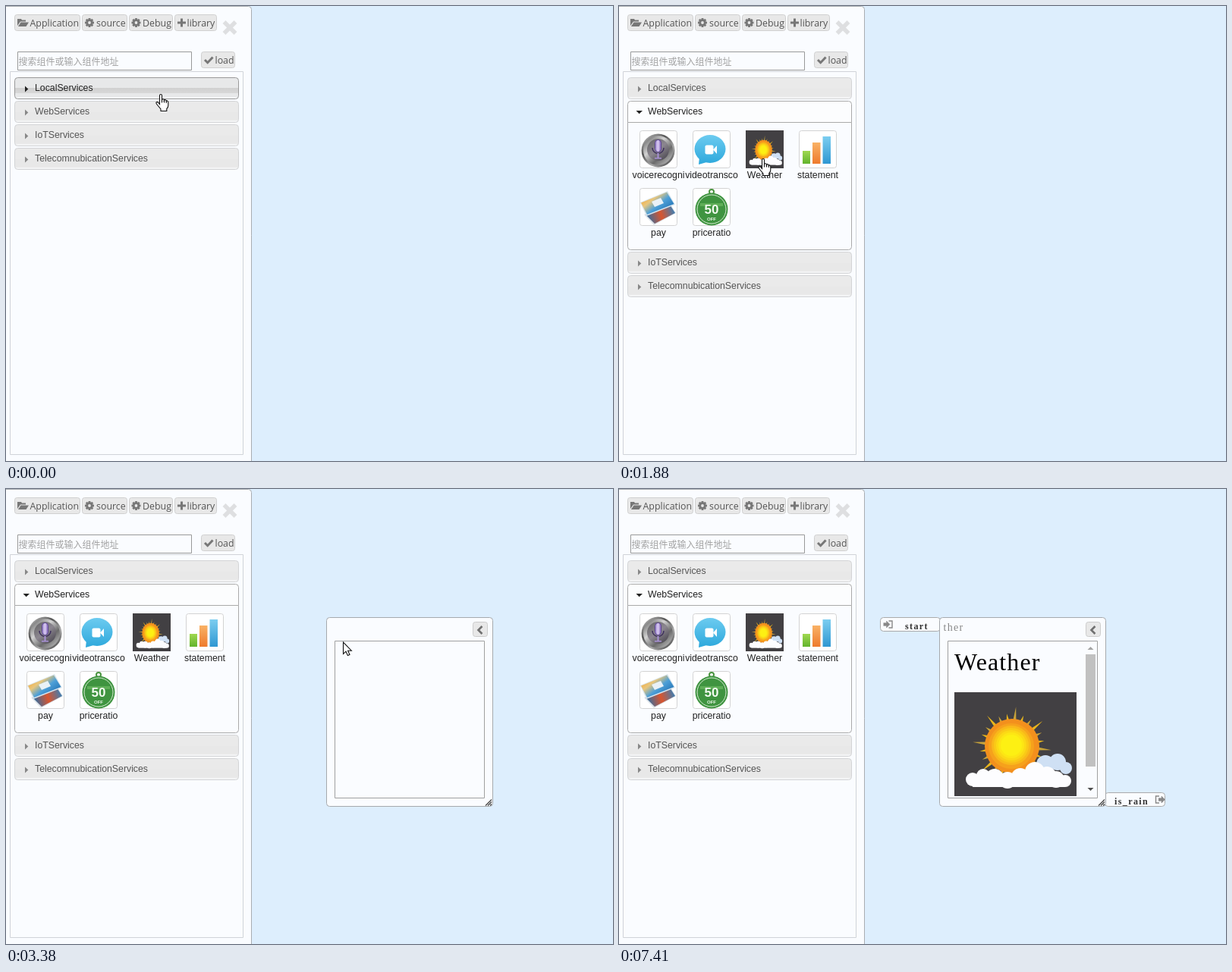
Recreate the animation shown at these times as an HTML page with a canvas. Size 800 by 600 pixels, loop 8910 ms.

```html
<!DOCTYPE html>
<html lang="en">
<head>
<meta charset="utf-8">
<title>Service composer</title>
<style>
html, body { margin: 0; width: 100%; height: 100%; overflow: hidden; background: #ddeefd; }
canvas { display: block; }
</style>
</head>
<body>
<canvas id="stage" width="800" height="600"></canvas>
<script>
const g = document.getElementById('stage').getContext('2d');
const LOOP = 8910;
const ARIAL = '12.3px "Liberation Sans", sans-serif';
const HUMAN = '12.4px "Open Sans", sans-serif';
const PAPER = '#fafcff';

// Each entry is [start time, ...values]; it holds until the next one.
const CURSOR = [
  [0, 'hand', 197, 116], [150, 'hand', 160, 119], [280, 'hand', 116, 129],
  [400, 'hand', 93, 135], [550, 'hand', 93, 139],
  [1340, 'hand', 94, 152], [1460, 'hand', 98, 186], [1610, 'hand', 168, 200],
  [1760, 'hand', 177, 201], [1880, 'hand', 183, 201],
  [2730, 'arrow', 400, 230], [2850, 'arrow', 481, 200], [3000, 'arrow', 496, 214],
  [3380, 'arrow', 444, 201], [3960, 'arrow', 457, 198], [4080, 'arrow', 472, 194],
  [4200, 'arrow', 480, 195], [4350, 'hand', 477, 189],
  [6320, 'hand', 499, 189], [6570, 'hand', 500, 189],
  [6850, 'arrow', 515, 214], [6970, 'arrow', 543, 260],
  [7110, 'arrow', 604, 406], [7260, 'arrow', 677, 544], [7410, 'none', 0, 0]
];
const HEIGHT = [[0, 0], [800, 4], [920, 42], [1040, 93], [1190, 167], [1340, 168]];
const GHOST = [[0], [2730, 326, 194], [2850, 407, 164], [3000, 422, 178], [3380]];
const TIP = [[0, 0], [2340, 0.4], [2460, 0.9], [2580, 0.5], [2730, 0.12], [3380, 0]];

const at = (list, t) => list.filter(k => k[0] <= t).pop().slice(1);

function box(x, y, w, h, fill, stroke, r = 0) {
  g.beginPath();
  g.roundRect(x + 0.5, y + 0.5, w - 1, h - 1, r);
  g.fillStyle = fill;
  g.fill();
  if (stroke) {
    g.strokeStyle = stroke;
    g.lineWidth = 1;
    g.stroke();
  }
}

function rect(x, y, w, h, fill) {
  g.fillStyle = fill;
  g.fillRect(x, y, w, h);
}

function disc(x, y, r, fill) {
  g.beginPath();
  g.arc(x, y, r, 0, 7);
  g.fillStyle = fill;
  g.fill();
}

function poly(points, fill) {
  g.beginPath();
  points.forEach(p => g.lineTo(...p));
  g.closePath();
  g.fillStyle = fill;
  g.fill();
}

function line(points, color, width) {
  g.beginPath();
  points.forEach(p => g.lineTo(...p));
  g.strokeStyle = color;
  g.lineWidth = width;
  g.stroke();
}

function text(s, x, y, font, color, align = 'left', spacing = 0) {
  g.font = font;
  g.fillStyle = color;
  g.textAlign = align;
  g.letterSpacing = spacing + 'px';
  g.fillText(s, x, y);
}

function blend(x0, y0, x1, y1, ...colors) {
  const f = g.createLinearGradient(x0, y0, x1, y1);
  colors.forEach((c, i) => f.addColorStop(i / (colors.length - 1), c));
  return f;
}

function placed(x, y, draw, sx = 1, sy = 1) {
  g.save();
  g.translate(x, y);
  g.scale(sx, sy);
  draw();
  g.restore();
}

function clipped(x, y, w, h, draw) {
  g.save();
  g.beginPath();
  g.rect(x, y, w, h);
  g.clip();
  draw();
  g.restore();
}

// --- toolbar ---

function gear(x, y) {
  for (let i = 0; i < 4; i++) {
    const a = i * Math.PI / 4, c = 6 * Math.cos(a), s = 6 * Math.sin(a);
    line([[x - c, y - s], [x + c, y + s]], '#777', 2.8);
  }
  disc(x, y, 4.7, '#777');
  disc(x, y, 1.9, '#e8e8e8');
}

function folder() {
  poly([[15, 26], [15, 17], [20, 17], [21, 18.5], [26, 18.5], [26, 20.5], [19, 20.5]], '#777');
  poly([[16, 27], [19.5, 21.5], [30, 21.5], [26.5, 27]], '#777');
}

function toolbar() {
  const button = (x, y, w, label, tx) => {
    box(x, y, w, 22, '#e8e8e8', '#d0d0d0', 3);
    text(label, tx, y + 16, HUMAN, '#555');
  };
  button(11, 11, 87, 'Application', 31.5);
  button(100, 11, 60, 'source', 119);
  button(162, 11, 58, 'Debug', 180);
  button(222, 11, 56, 'library', 238.5);
  button(257, 60, 45, 'load', 275.5);
  folder();
  gear(110, 22);
  gear(171.5, 22);
  line([[226, 22], [237, 22]], '#777', 3);
  line([[231.5, 16.5], [231.5, 27.5]], '#777', 3);
  line([[262, 71], [265.7, 74.7], [272.5, 67.5]], '#777', 3);
  line([[287.5, 21], [302.5, 36]], '#dedfe1', 5.5);
  line([[302.5, 21], [287.5, 36]], '#dedfe1', 5.5);
  box(15, 60, 230, 25, PAPER, '#999');
  text('搜索组件或输入组件地址', 16.5, 77.5, '12px "Noto Sans CJK SC", "Noto Sans CJK", sans-serif', '#a2a2a2');
}

// --- service icons, each in a 50 x 50 tile ---

function weather() {
  rect(0, 0, 161, 137, '#424043');
  const sx = 76, sy = 71;
  for (let i = 0; i < 24; i++) {
    const a = i * Math.PI / 12 + 0.1, len = i % 3 ? 43 : 52;
    const p = (r, b) => [sx + r * Math.cos(b), sy + r * Math.sin(b)];
    poly([p(32, a - 0.07), p(len, a), p(32, a + 0.07)], i % 2 ? '#e8b51c' : '#c9a43a');
  }
  disc(sx, sy, 36, '#f3901d');
  disc(sx - 1, sy, 30, '#f6a11c');
  ['#f9b81a', '#fac917', '#fcd915', '#fde614', '#fdf013'].forEach((c, i) => disc(sx - 1, sy - 1, 26 - i * 3, c));
  [[120, 95, 12], [136, 92, 11], [147, 100, 8]].forEach(([x, y, r]) => disc(x, y, r, '#cfe0f4'));
  [[24, 115, 9], [38, 110, 9], [53, 113, 12], [70, 116, 11], [87, 112, 12],
   [106, 105, 13], [122, 110, 12], [134, 115, 11], [146, 117, 8]]
    .forEach(([x, y, r]) => disc(x, y, r, '#fdfdff'));
  rect(24, 114, 122, 11, '#fdfdff');
}

function voice() {
  disc(24.5, 26.5, 22, blend(8, 6, 42, 47, '#b5b5b5', '#555', '#aaa', '#444'));
  disc(24.5, 26.5, 19.5, blend(10, 10, 40, 44, '#777', '#d2d2d2', '#6b6b6b', '#bbb'));
  disc(24.5, 25.5, 14.5, blend(12, 12, 34, 40, '#666', '#8c8790', '#4b4850'));
  g.beginPath();
  g.arc(24.5, 23, 7.5, 0, Math.PI);
  g.strokeStyle = '#3d2f5c';
  g.lineWidth = 1.5;
  g.stroke();
  box(20, 12, 9, 17, blend(20, 0, 29, 0, '#9077c4', '#d9cbf2', '#7655b0'), '#5a4590', 4);
  rect(23.5, 30, 2, 6, '#a891d6');
  rect(20, 36, 9, 1.5, '#a891d6');
}

function video() {
  const sky = blend(0, 6, 0, 44, '#6ccbf0', '#2fa9dc');
  g.beginPath();
  g.ellipse(23, 24.5, 20.5, 18.5, 0, 0, 7);
  g.fillStyle = sky;
  g.fill();
  poly([[9, 35], [8, 45], [22, 41]], sky);
  box(16, 19, 12, 13, '#fff', null, 2);
  poly([[27, 25.5], [32, 20], [32, 31]], '#fff');
}

function statement() {
  rect(5, 27, 10, 17, blend(0, 27, 0, 44, '#a0d850', '#62b32c'));
  rect(18, 16, 10.5, 28, blend(0, 16, 0, 44, '#f9b266', '#ee7a2c'));
  rect(31.5, 8, 10.5, 36, blend(0, 8, 0, 44, '#7bcdf0', '#2f97d2'));
}

function pay() {
  poly([[6, 35], [40, 20], [48, 33], [19, 49]], '#dfe5ea');
  poly([[8, 35], [40, 22], [47, 33], [20, 47]], blend(10, 40, 46, 28, '#2f6ea3', '#d8552f', '#3a7fb5'));
  poly([[1, 19], [37, 4], [47, 22], [9, 37]], '#d9e6ee');
  poly([[2, 19.5], [36, 5.5], [45.5, 21], [10, 35]], blend(8, 9, 28, 34, '#f2a83c', '#e8c67c', '#4da0d8', '#2f7fbe'));
  poly([[16, 18], [28, 13], [32, 20], [20, 25]], '#e9f1f7');
}

function price() {
  g.beginPath();
  g.arc(25, 5, 3, 0, 7);
  g.strokeStyle = '#4a9440';
  g.lineWidth = 2;
  g.stroke();
  disc(25, 28, 21.5, '#3f9440');
  g.beginPath();
  g.arc(25, 28, 19, 0, 7);
  g.strokeStyle = '#d5ead0';
  g.lineWidth = 1;
  g.stroke();
  rect(10, 20, 30, 4, '#5fae58');
  text('50', 25, 34, 'bold 17px "Liberation Sans", sans-serif', '#f2faf0', 'center');
  text('OFF', 25, 43, 'bold 6px "Liberation Sans", sans-serif', '#f2faf0', 'center');
}

const small = () => placed(0, 0, weather, 50 / 161, 50 / 137);
const SERVICES = [
  ['voicerecogni', voice], ['videotransco', video], ['Weather', small],
  ['statement', statement], ['pay', pay], ['priceratio', price]
];

// --- accordion ---

function header(y, label, state) {
  const hot = state === 'hover', open = state === 'open';
  if (open) {
    box(11, y, 296, 29, '#fcfdfe', '#aaa', [4, 4, 0, 0]);
  } else {
    const fill = hot ? '#e7e8e9' : '#eaeaea';
    box(11, y, 296, 29, fill, null, 4);
    if (hot) {
      rect(12, y + 14, 294, 7, blend(0, y + 14, 0, y + 21, '#d0d0d0', '#d8d8d8'));
    } else {
      rect(12, y + 15, 294, 10, '#e8e8e8');
    }
    rect(12, y + 26, 294, 2, '#f3f4f5');
    box(11, y, 296, 29, 'transparent', hot ? '#999' : '#d3d4d6', 4);
  }
  const ink = hot || open ? '#222' : '#888';
  poly(open ? [[22.5, y + 13], [31, y + 13], [26.7, y + 17.3]]
            : [[25, y + 11.5], [29.3, y + 15.5], [25, y + 19.5]], ink);
  text(label, 38, y + 18, ARIAL, hot || open ? '#212121' : '#555');
}

function scrollbar(x, top, bottom, thumbTop, thumb) {
  poly([[x + 2.5, top + 5], [x + 10.5, top + 5], [x + 6.5, top + 1]], '#a3a3a3');
  rect(x, thumbTop, 13, thumb, '#c1c1c1');
  poly([[x + 2.5, bottom - 5], [x + 10.5, bottom - 5], [x + 6.5, bottom - 1]], '#505050');
}

function services(h) {
  box(11, 153, 296, h + 1, PAPER, '#aaa', [0, 0, 4, 4]);
  const top = 154 + Math.round(10 * h / 168);
  const cols = h < 168 ? 3 : 4;
  clipped(12, 154, 294, h - 1, () => {
    SERVICES.forEach(([label, draw], i) => {
      const x = 27 + 70 * (i % cols), y = top + 76 * Math.floor(i / cols);
      box(x, y, 50, 50, '#fff', '#d3d3d3', 3);
      clipped(x, y, 50, 50, () => placed(x, y, draw));
      text(label, x + 25, y + 63, ARIAL, '#222', 'center');
    });
    if (h < 168) scrollbar(291, 160, 240, 171, Math.max(6, (h - 34) * h / 168));
  });
}

function sidebar(t, kind, x, y) {
  box(-6, 0, 330, 610, PAPER, '#a9adb2', 4);
  toolbar();
  box(5, 86, 308, 506, PAPER, '#d0d3d8');
  const [h] = at(HEIGHT, t);
  const tops = [94, 125, 156 + h, 187 + h];
  ['LocalServices', 'WebServices', 'IoTServices', 'TelecomnubicationServices'].forEach((label, i) => {
    const hover = kind === 'hand' && x < 300 && y >= tops[i] && y < tops[i] + 29;
    header(tops[i], label, i === 1 && h ? 'open' : hover ? 'hover' : '');
  });
  if (h) services(h);
}

// --- work area ---

function tooltip(alpha) {
  if (!alpha) return;
  rect(195, 248, 118, 2, 'rgba(70,70,70,.75)');
  rect(311, 235, 2, 15, 'rgba(70,70,70,.75)');
  box(188, 230, 123, 18, 'rgba(253,253,254,.9)', '#e9e7ea');
  g.globalAlpha = alpha;
  text('license_recognition', 194, 242, HUMAN, '#555');
  g.globalAlpha = 1;
}

function port(x, y, dir) {
  line([[x, y - 2], [x + 4, y - 2], [x + 4, y - 4.5], [x + 8.5, y], [x + 4, y + 4.5], [x + 4, y + 2], [x, y + 2]], '#888', 0.5);
  poly([[x, y - 1.8], [x + 4, y - 1.8], [x + 4, y - 4.5], [x + 8.5, y], [x + 4, y + 4.5], [x + 4, y + 1.8], [x, y + 1.8]], '#888');
  const edge = dir === 'in' ? x + 11.5 : x - 3.5, lip = dir === 'in' ? x + 7 : x + 1;
  line([[lip, y - 4.5], [edge, y - 4.5], [edge, y + 4.5], [lip, y + 4.5]], '#888', 1.4);
}

function panel(loaded) {
  const bold = 'bold 12px "Liberation Serif", serif';
  if (loaded) {
    box(344, 169, 80, 19, PAPER, '#aaa', 4);
    port(348.5, 178.5, 'in');
    text('start', 377, 185, bold, '#333', 'left', 1.4);
    box(640, 400, 80, 19, PAPER, '#aaa', 4);
    port(711, 409.5, 'out');
    clipped(641, 401, 78, 17, () => text('is_rain', 653, 416, bold, '#333', 'left', 1.4));
  }
  box(422, 169, 220, 250, PAPER, '#a5a9ad', 4);
  box(615, 175, 20, 20, '#e8e8e8', '#ccc', 3);
  line([[627.5, 181], [622.5, 186], [627.5, 191]], '#707070', 2.6);
  box(433, 200, 198, 208, PAPER, '#a0a0a0');
  for (let i = 0; i < 3; i++) line([[632 + i * 3, 417.5], [640, 409.5 + i * 3]], '#444', 1.2);
  if (!loaded) return;
  text('ther', 427.5, 187, '14px "Liberation Serif", serif', '#888', 'left', 1.3);
  text('Weather', 442, 239, '32px "Liberation Serif", serif', '#000', 'left', 1.1);
  placed(442, 268, () => clipped(0, 0, 161, 137, weather));
  scrollbar(615, 207, 399, 218, 148);
}

const HAND = new Path2D('M5.5 13.5V2Q5.5.5 7 .5T8.5 2V8Q8.7 6.5 10.2 6.8T11.5 8.2Q12.2 7.2 13.3 7.8T14.3 9.2Q15.2 8.6 16 9.3T16.8 11V15Q16.8 18 14.8 19.5V22.5H7V20L2.5 14.5Q.4 12 1 11.2Q2.2 9.8 4 11.6Z');
const FINGERS = new Path2D('M8.5 7V11.5M11.5 8V11.5M14.3 9V12');
const ARROW = new Path2D('M.5 1V16.5L4 13.2L6.4 18.6L9 17.5L6.6 12.2H11.3Z');

function pointer(kind, x, y) {
  if (kind === 'none') return;
  placed(x, y, () => {
    const shape = kind === 'hand' ? HAND : ARROW;
    g.fillStyle = '#fff';
    g.strokeStyle = '#111';
    g.lineWidth = 1.1;
    g.fill(shape);
    g.stroke(shape);
    if (kind === 'hand') g.stroke(FINGERS);
  });
}

function draw(t) {
  const [kind, x, y] = at(CURSOR, t);
  const [gx, gy] = at(GHOST, t);
  rect(0, 0, 800, 600, '#ddeefd');
  sidebar(t, kind, x, y);
  tooltip(at(TIP, t)[0]);
  if (gx) box(gx, gy, 100, 100, '#c9d7e5', '#a4b3c3');
  if (t >= 3380) panel(t >= 6450);
  pointer(kind, x, y);
}

const start = performance.now();
function tick() {
  draw((performance.now() - start) % LOOP);
  requestAnimationFrame(tick);
}
tick();
</script>
</body>
</html>
```
